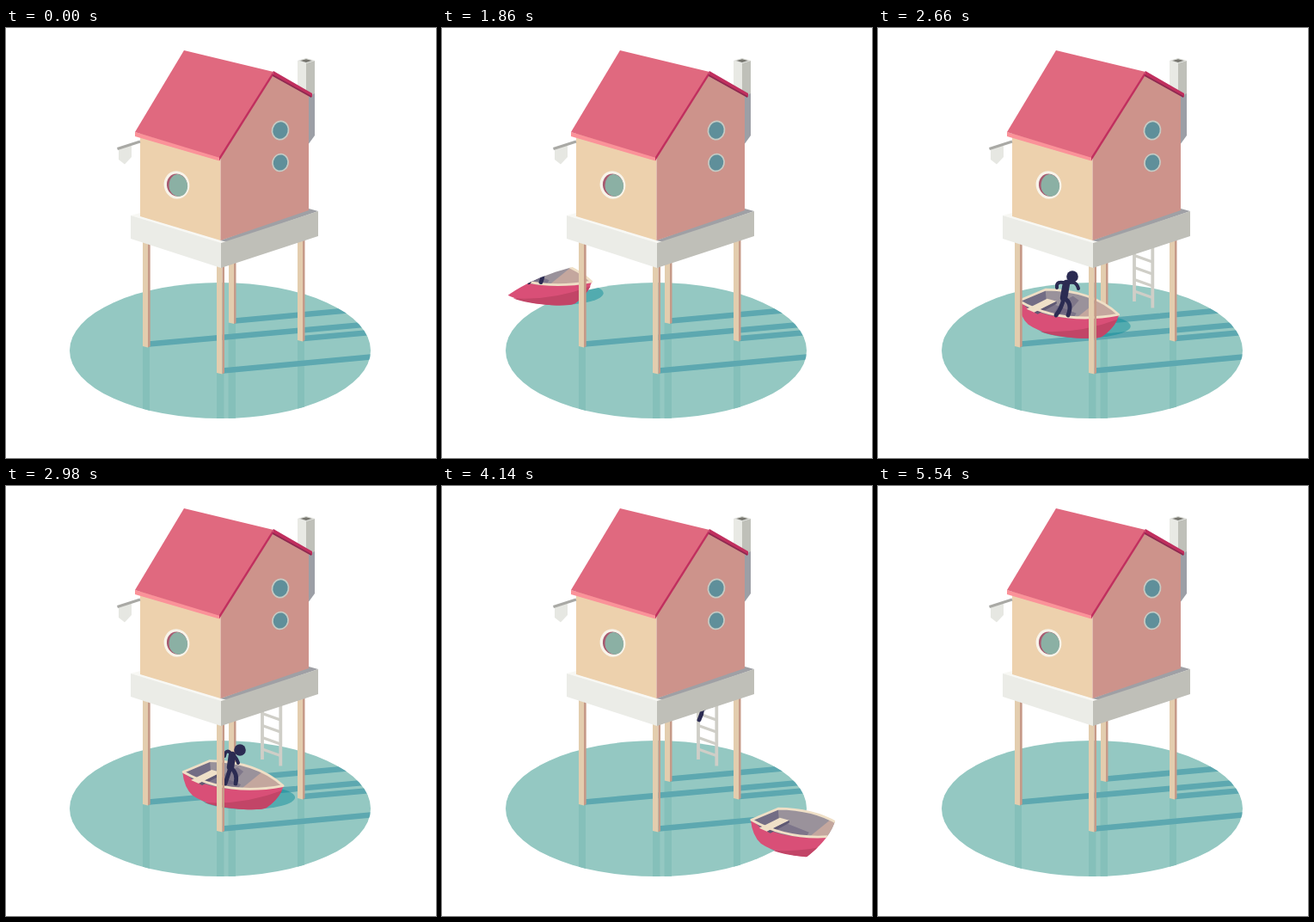
An HTML page for the animation above (6540 ms loop, 500 by 500 pixels).

```html
<!DOCTYPE html>
<html lang="en">
<head>
<meta charset="utf-8">
<title>House on stilts</title>
<style>
  html, body { margin: 0; width: 100%; height: 100%; overflow: hidden; background: #fff; }
  svg { display: block; width: 100vw; height: 100vh; }
  .limb { fill: none; stroke: #2b2b52; stroke-linecap: round; stroke-linejoin: round; }
</style>
</head>
<body>
<svg viewBox="0 0 500 500">
  <defs>
    <clipPath id="disc"><ellipse cx="249" cy="375" rx="175" ry="79"/></clipPath>
    <clipPath id="sea"><ellipse cx="249" cy="372" rx="211" ry="106"/></clipPath>
    <clipPath id="reach">
      <ellipse cx="249" cy="372" rx="211" ry="106"/>
      <rect x="215" y="180" width="150" height="180"/>
    </clipPath>
    <clipPath id="pane"><ellipse cx="200" cy="183" rx="11" ry="13" transform="rotate(-14 200 183)"/></clipPath>
  </defs>

  <!-- water -->
  <g clip-path="url(#disc)">
    <rect x="70" y="290" width="360" height="170" fill="#94c8c2"/>
    <g fill="#85c0ba">
      <rect x="159" y="370" width="8" height="90"/>
      <rect x="245" y="400" width="8.500" height="60"/>
      <rect x="258.500" y="343" width="8.500" height="115"/>
      <rect x="339" y="363" width="8" height="95"/>
    </g>
    <g stroke="#5da8b0" stroke-width="6.600">
      <path d="M266 340.500L430 325.500M166 367.500L430 343.700M346 361L430 353.500M252 398.500L430 382"/>
    </g>
    <g id="shade"><ellipse cx="350" cy="387" rx="55" ry="14" fill="#008797" opacity=".45"/></g>
  </g>

  <!-- far posts -->
  <path d="M259 260h6v84l-6-1.500z M339 235h6v129.500l-6-1.500z" fill="#e3cdae"/>
  <path d="M265 260h2.500v83l-2.500 1z M345 235h2.500v128l-2.500 1.500z" fill="#c69a88"/>

  <g id="ladder" fill="none" stroke="#cfcec7" stroke-width="3.800">
    <path d="M298 240V318M319.300 240V325.500"/>
    <path d="M298 264.500l21 7.500M298 278.500l21 7.500M298 292.500l21 7.500M298 306l21 7.500" stroke-width="3.400"/>
  </g>

  <g clip-path="url(#sea)">
    <g id="boat">
      <path d="M274 357Q276 376 286 385Q305 398 345 401Q366 402 372 399Q387 388 392 373Q340 386 274 357Z" fill="#d94f77"/>
      <path d="M300 393Q345 396 390 379Q384 391 372 399Q366 402 345 401Q315 399 300 393Z" fill="#c24567"/>
      <path d="M275 357.500L306 344.500Q358 344 391 373.500Q325 386 275 357.500Z" fill="#9a929b"/>
      <path d="M276 358L306 345.500L307 357L285 366Z" fill="#736d85"/>
      <path d="M285 366L307 358L342 372L338 378Q308 376 285 366Z" fill="#7d758a"/>
      <path d="M366 358Q382 365 391 373.500Q368 379 342 377.500Z" fill="#c4a79e"/>
      <path d="M284 367L308 355L319 358L293 371Z" fill="#efe0c8"/>
      <path d="M293 371L319 358V361L297 373Z" fill="#5f5974"/>
      <path d="M275 357.500L306 344.500Q360 345 391 373.500Q325 386 275 357.500Z" fill="none" stroke="#efdfc6" stroke-width="2.800" stroke-linejoin="round"/>
      <path id="cast" d="M315 373L324 359L338 352L345 357L332 372Z" fill="#5d5775" opacity=".45"/>
    </g>
  </g>

  <g clip-path="url(#reach)">
    <g id="man">
      <path class="limb" id="armL" stroke-width="4"/>
      <path class="limb" id="legL" stroke-width="4.800"/>
      <path class="limb" id="legR" stroke-width="4.800"/>
      <path class="limb" id="torso" stroke-width="8.500"/>
      <path class="limb" id="armR" stroke-width="4"/>
      <circle id="head" r="6.800" fill="#2b2b52"/>
    </g>
  </g>

  <!-- near posts -->
  <path d="M159 240h6v131.500l-6-1.500z M245 270h6.500v132.500l-6.500-1.500z" fill="#e3cdae"/>
  <path d="M165 240h2.700v130l-2.700 1.500z M251.500 270h2.500v131l-2.500 1.500z" fill="#c69a88"/>

  <!-- chimney -->
  <path d="M339 38L349 41V80H339Z" fill="#e8e9e4"/>
  <path d="M349 41L359 38V90H349Z" fill="#bfc0b9"/>
  <path d="M351 80L359 76V125L351 136Z" fill="#9c9fa6"/>
  <path d="M339 38L349 35L359 38L349 41Z" fill="#d9dad5"/>
  <path d="M342.500 38L349 36.200L355.500 38L349 40Z" fill="#77766f"/>

  <!-- platform -->
  <path d="M145 218L156 215L258 244V248L250 251Z" fill="#f8f8f4"/>
  <path d="M249 247L352 210L363 213L258 249Z" fill="#9fa0a5"/>
  <path d="M145 218L250 250V279L145 245Z" fill="#ebece7"/>
  <path d="M250 250L363 213V242L250 279Z" fill="#bfbfb8"/>

  <!-- walls and roof -->
  <path d="M156 122L249.500 148V247L156 219Z" fill="#edd1ad"/>
  <path d="M249.500 150L310 53L352 78V212L249.500 247Z" fill="#cd938b"/>
  <path d="M150 121L249 150L248 154.500L150 126Z" fill="#fb9299"/>
  <path d="M207 26L311 51L249 151L150 121Z" fill="#e0697f"/>
  <path d="M311 50L310 56L248 154.500V150Z" fill="#c02f5e"/>
  <path d="M311 50L356 76V80.500L310 55.500Z" fill="#c02f5e"/>
  <path d="M310 54L355 79V81L310 56Z" fill="#8e2950"/>

  <!-- bar and cloth -->
  <path d="M131 141L146 136V150L138 158.500L131 153Z" fill="#e6e7e2"/>
  <path d="M129.500 140.500L156 132" stroke="#a9a9a5" stroke-width="3"/>

  <!-- windows -->
  <g transform="rotate(-14 198.500 182.500)">
    <ellipse cx="198.500" cy="182.500" rx="14.800" ry="16.200" fill="#f8f4ea"/>
    <ellipse cx="198.800" cy="182.700" rx="11.800" ry="13.200" fill="#a85a70"/>
  </g>
  <g clip-path="url(#pane)">
    <ellipse cx="201" cy="183" rx="11.500" ry="13.500" fill="#8bb0a4"/>
    <circle id="peek" cx="206.500" cy="183.500" r="9.500" fill="#2b2b52"/>
  </g>
  <g fill="#5f8f9a" stroke="#c6cbc4" stroke-width="1.700">
    <ellipse cx="319" cy="119" rx="9.500" ry="10.700" transform="rotate(14 319 119)"/>
    <ellipse cx="319" cy="156.500" rx="9" ry="10" transform="rotate(14 319 156.500)"/>
  </g>
</svg>
<script>
const LOOP = 6540, STEP = 40, LEAD = 20;
const el = id => document.getElementById(id);
const clamp = v => Math.min(1, Math.max(0, v));
const span = (t, a, b) => clamp((t - a) / (b - a));
const ease = p => p * p * (3 - 2 * p);
const move = (id, x, y) => el(id).setAttribute('transform', `translate(${x.toFixed(2)} ${y.toFixed(2)})`);
const boatAt = t => [(t - 3500) * .1325, (t - 3500) * .048];

// Joints: head, shoulder, hip, then elbow + hand and knee + foot, left then right
const stand = [[226,289],[219,297],[216,314],[209,295],[208,302],[229,295],[233,303],[213,325],[207,334],[224,321],[221,334]];
const lean = [[272,307],[263,313],[261,327],[257,307],[254,314],[267,315],[270,322],[258,337],[255,346],[268,335],[267,346]];
const climb = [[305,266],[304,273],[303,297],[300,270],[299,263],[314,270],[321,262],[302,304],[299,311],[314,299],[314,308]];

const shift = (pose, [dx, dy]) => pose.map(([x, y]) => [x + dx, y + dy]);
const mix = (a, b, p) => a.map(([x, y], i) => [x + (b[i][0] - x) * p, y + (b[i][1] - y) * p]);
const ride = (pose, from, t) => {
  const a = boatAt(from), b = boatAt(t);
  return shift(pose, [b[0] - a[0], b[1] - a[1]]);
};
const wave = (t, period) => Math.sin(Math.PI * (t - 3500) / period) ** 2;

function climbing(t) {
  const pose = shift(climb, [0, (3500 - t) * .061]);
  const right = 14 * wave(t, 1280 / 3), left = 8 * wave(t, 320);
  [[7, left], [8, left], [9, right], [10, right], [6, left / 2]].forEach(([i, lift]) => pose[i][1] -= lift);
  return pose;
}

function poseAt(t) {
  const aboard = mix(ride(stand, 2660, t), ride(lean, 2980, t), span(t, 2660, 2980));
  return mix(aboard, climbing(t), ease(span(t, 2980, 3260)));
}

function drawMan(t) {
  el('man').style.display = t < 4500 ? '' : 'none';
  const p = poseAt(t);
  const line = (id, ...joints) => el(id).setAttribute('d', 'M' + joints.map(j => p[j].map(v => v.toFixed(2))).join('L'));
  const bend = (id, a, b, c) => {
    const mid = p[b].map((v, i) => 1.5 * v - (p[a][i] + p[c][i]) / 4);
    el(id).setAttribute('d', `M${p[a]}Q${mid} ${p[c]}`);
  };
  line('torso', 1, 2);
  bend('armL', 1, 3, 4);
  bend('armR', 1, 5, 6);
  bend('legL', 2, 7, 8);
  bend('legR', 2, 9, 10);
  el('head').setAttribute('cx', p[0][0]);
  el('head').setAttribute('cy', p[0][1]);
}

function draw(ms) {
  const t = Math.floor((ms % LOOP - LEAD) / STEP) * STEP + LEAD;
  const seen = ease(span(t, 460, 860)) - ease(span(t, 1220, 1620));
  move('peek', 16 * (1 - seen), 0);
  const down = ease(span(t, 1920, 2500)) - ease(span(t, 4940, 5540));
  move('ladder', 0, -74 * (1 - down));
  const at = boatAt(t);
  move('boat', ...at);
  move('shade', ...at);
  el('cast').setAttribute('opacity', .45 * (1 - span(t, 2980, 3220)));
  drawMan(t);
}

let start;
function tick(now) {
  start ??= now;
  draw(now - start);
  requestAnimationFrame(tick);
}
draw(0);
requestAnimationFrame(tick);
</script>
</body>
</html>
```
